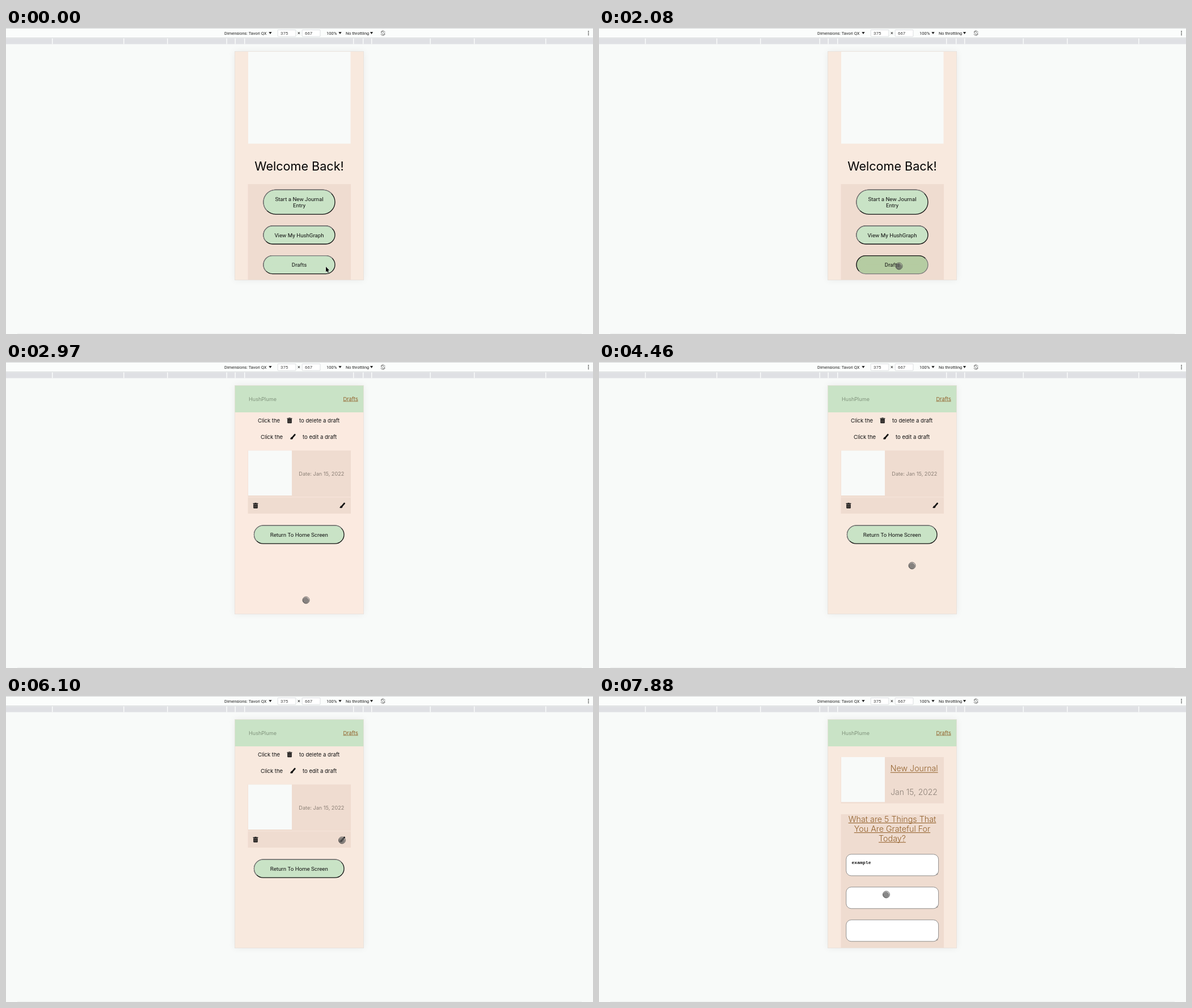
Recreate the animation shown at these times as an HTML page with a canvas. Size 1035x541 px, loop 8000 ms.

```html
<!DOCTYPE html>
<html lang="en">
<head>
<meta charset="utf-8">
<title>Journal app preview</title>
<style>
html, body { margin: 0; width: 100%; height: 100%; overflow: hidden; background: #f8faf9; }
canvas { display: block; width: 1035px; height: 541px; }
</style>
</head>
<body>
<canvas id="stage"></canvas>
<script>
const W = 1035, H = 541, LOOP = 8000;
const canvas = document.getElementById('stage');
const ctx = canvas.getContext('2d');
const dpr = window.devicePixelRatio || 1;
canvas.width = W * dpr;
canvas.height = H * dpr;

const SANS = 'Inter, "Open Sans", sans-serif';
const UI = 'Roboto, "Liberation Sans", sans-serif';
const MONO = '"Liberation Mono", monospace';
const GREEN = '#c9e3c6', PANEL = '#efdcd0';
const BROWN = '#92602a', MUTED = '#8d8177', INK = '#111';
const REST = [201, 227, 198], PRESSED = [181, 204, 162];

// Pointer stops: time, x, y
const POINTER = [
  [0, 564, 422], [150, 559, 422], [290, 548, 422], [440, 543, 421.5],
  [880, 544.5, 421], [1180, 535, 421], [1330, 529, 421],
  [4460, 552, 360], [4600, 573, 291], [4750, 579.5, 268.5],
  [5050, 583.5, 265.5], [5200, 590, 262], [5350, 597, 258], [5500, 601.5, 257],
  [5650, 600, 257], [5800, 596, 256], [5950, 593, 255.5], [6100, 592.5, 255],
  [7290, 562, 290], [7440, 520, 338], [7590, 503, 352], [7880, 506.5, 351]
];
const TOUCH_AT = 880;

function rect(x, y, w, h, color) {
  ctx.fillStyle = color;
  ctx.fillRect(x, y, w, h);
}

function roundRect(x, y, w, h, r) {
  ctx.beginPath();
  ctx.roundRect(x, y, w, h, r);
}

function poly(points, color) {
  ctx.beginPath();
  points.forEach(([x, y]) => ctx.lineTo(x, y));
  ctx.closePath();
  ctx.fillStyle = color;
  ctx.fill();
}

function text(str, x, y, size, { font = SANS, weight = 400, color = INK, align = 'left', line = 0 } = {}) {
  ctx.font = `${weight} ${size}px ${font}`;
  ctx.textAlign = align;
  ctx.fillStyle = color;
  ctx.fillText(str, x, y);
  if (line) {
    const w = ctx.measureText(str).width;
    const left = align === 'center' ? x - w / 2 : align === 'right' ? x - w : x;
    rect(left, y + line, w, size / 14, color);
  }
}

function toolbar() {
  rect(0, 0, W, 17, '#fbfdfc');
  rect(0, 0, W, 1, '#d6d9d9');
  rect(0, 17, W, 1, '#d3d6d8');
  rect(0, 18.5, W, 10, '#dfe0e4');
  for (const x of [81, 207, 284, 388.5, 403.5, 420, 612, 629, 644, 747.5, 825, 951]) {
    rect(x, 18, 1.4, 10.5, '#fbfdfc');
  }
  const ui = { font: UI, color: '#222' };
  text('Dimensions: Tavori QX', 385, 11.7, 7.45, ui);
  text('100%', 565, 11.7, 7.6, ui);
  text('No throttling', 599, 11.7, 7.4, ui);
  for (const x of [466, 589, 644.5]) poly([[x - 2.6, 7], [x + 2.6, 7], [x, 11]], '#222');
  for (const [x, str] of [[479, '375'], [522, '667']]) {
    roundRect(x + 0.2, 3.3, 31.8, 11.8, 1);
    ctx.fillStyle = '#fff';
    ctx.fill();
    ctx.strokeStyle = '#cfd1d4';
    ctx.lineWidth = 0.7;
    ctx.stroke();
    text(str, x + 5, 12, 7.9, { ...ui, color: '#444' });
  }
  text('×', 514, 12.3, 9, ui);

  // rotate icon and menu dots
  ctx.strokeStyle = '#555';
  ctx.lineWidth = 0.8;
  ctx.beginPath();
  ctx.arc(664.5, 9, 4, -2.6, -0.3);
  ctx.moveTo(668.3, 10.3);
  ctx.arc(664.5, 9, 4, 0.3, 2.7);
  ctx.stroke();
  ctx.save();
  ctx.translate(664.5, 9);
  ctx.rotate(-Math.PI / 4);
  ctx.strokeRect(-1.5, -3, 3, 6);
  ctx.restore();
  for (const y of [6, 9, 12]) {
    ctx.beginPath();
    ctx.arc(1027, y, 0.9, 0, 7);
    ctx.fillStyle = '#444';
    ctx.fill();
  }
}

function pill(x, y, w, h, lines, press = 0) {
  const r = h / 2;
  const fill = `rgb(${REST.map((c, i) => Math.round(c + (PRESSED[i] - c) * press))})`;
  const [lit, dark] = press ? [INK, '#777'] : ['#777', INK];
  const paint = edge => {
    roundRect(x, y, w, h, r);
    ctx.fillStyle = fill;
    ctx.fill();
    ctx.lineWidth = 1.3;
    ctx.strokeStyle = edge;
    ctx.stroke();
  };
  paint(dark);
  // bevel: the top and left edges take the other shade
  ctx.save();
  ctx.beginPath();
  ctx.moveTo(x - 2, y - 2);
  ctx.lineTo(x + w + 2, y - 2);
  ctx.lineTo(x + w - r, y + r);
  ctx.lineTo(x + r, y + r);
  ctx.lineTo(x - 2, y + h + 2);
  ctx.clip();
  paint(lit);
  ctx.restore();
  lines.forEach((str, i) => {
    const ly = y + r + 3.5 + (i - (lines.length - 1) / 2) * 11.6;
    text(str, x + w / 2, ly, 9.7, { font: UI, align: 'center' });
  });
}

function trash(x, y) {
  rect(x - 4.4, y - 4.3, 8.8, 1.4, INK);
  rect(x - 1.5, y - 5, 3, 1, INK);
  roundRect(x - 3.8, y - 2.4, 7.6, 7.2, [0, 0, 1, 1]);
  ctx.fillStyle = INK;
  ctx.fill();
  for (const dx of [-2, 0, 2]) rect(x + dx - 0.25, y - 1.3, 0.5, 5, '#c9b8ac');
}

function brush(x, y) {
  ctx.strokeStyle = INK;
  ctx.lineCap = 'round';
  ctx.lineWidth = 2.7;
  ctx.beginPath();
  ctx.moveTo(x + 3.6, y - 3.7);
  ctx.lineTo(x - 0.2, y + 0.6);
  ctx.stroke();
  ctx.lineCap = 'butt';
  ctx.beginPath();
  ctx.moveTo(x - 2, y + 0.4);
  ctx.quadraticCurveTo(x + 1, y + 1, x + 0.4, y + 3);
  ctx.quadraticCurveTo(x - 1.5, y + 5.6, x - 5, y + 3.8);
  ctx.quadraticCurveTo(x - 3.6, y + 3, x - 3.6, y + 1.8);
  ctx.quadraticCurveTo(x - 3, y + 0.5, x - 2, y + 0.4);
  ctx.fillStyle = INK;
  ctx.fill();
}

function home(t) {
  rect(427, 42, 180.5, 162.5, '#f8faf9');
  text('Welcome Back!', 517, 252.3, 21.6, { align: 'center', color: '#000' });
  rect(426.5, 276, 181.5, 169, PANEL);
  const press = t < 1780 ? 0 : t < 1930 ? 0.6 : 1;
  pill(454, 286.2, 126, 43.2, ['Start a New Journal', 'Entry']);
  pill(454, 350, 126, 32, ['View My HushGraph']);
  pill(454, 402.6, 126, 32, ['Drafts'], press);
}

function header() {
  rect(403.5, 41.5, 227, 47.5, GREEN);
  text('HushPlume', 428, 68.5, 9.1, { color: '#80937c' });
  text('Drafts', 620.8, 68.5, 9.3, { color: BROWN, align: 'right', line: 1 });
}

function drafts(t) {
  const icons = t >= 2520, image = t >= 2820;
  const nudge = icons ? 0.5 : 0;
  header();
  text('Click the', 444.5 - nudge, 106.7 + nudge, 9.5);
  text('to delete a draft', 516.5 + nudge, 106.7 + nudge, 9.55);
  text('Click the', 450 - nudge * 2, 135.7 + nudge, 9.5);
  text('to edit a draft', 522 + nudge * 2, 135.7 + nudge, 9.55);

  const cardH = image ? 82 : 28;
  const rowY = 156.5 + cardH + 0.8;
  rect(426.5, 156.5, 181.5, cardH, PANEL);
  rect(426.5, rowY, 181.5, 28.8, PANEL);
  if (image) rect(427, 156.5, 77, 79.5, '#f8faf9');
  text('Date: Jan 15, 2022', 596.3, image ? 201 : 174, 9.15, { color: MUTED, align: 'right' });
  if (icons) {
    trash(500, 103.5);
    brush(505.7, 132.2);
    trash(440, rowY + 14.6);
    brush(593, rowY + 14.4);
  }
  pill(437.5, image ? 289.2 : 234.7, 158.5, 32, ['Return To Home Screen']);
}

function field(y, value) {
  roundRect(435.8, y, 162.8, 38, 9);
  ctx.fillStyle = '#fff';
  ctx.fill();
  ctx.strokeStyle = '#777';
  ctx.lineWidth = 0.8;
  ctx.stroke();
  ctx.beginPath();
  ctx.moveTo(594, y + 36.5);
  ctx.lineTo(597.5, y + 33);
  ctx.moveTo(596, y + 36.5);
  ctx.lineTo(597.5, y + 35);
  ctx.stroke();
  if (value) text(value, 445.5, y + 17.4, 8.1, { font: MONO, weight: 700 });
}

function journal() {
  const link = { color: BROWN, weight: 300, align: 'center', line: 1.5 };
  header();
  rect(426.5, 108, 181.5, 81.7, PANEL);
  rect(427, 108, 77, 79.5, '#f8faf9');
  text('New Journal', 555.7, 133.2, 14.2, link);
  text('Jan 15, 2022', 555.5, 174.5, 13.9, { color: MUTED, weight: 300, align: 'center' });
  rect(426.5, 209, 181.5, 236, PANEL);
  ['What are 5 Things That', 'You Are Grateful For', 'Today?'].forEach((str, i) => {
    text(str, 517, 222.5 + i * 17.1, 14.3, link);
  });
  field(279.8, 'example');
  field(337.8);
  field(395.8);
}

function arrow(x, y) {
  ctx.beginPath();
  for (const [dx, dy] of [[0, 0], [0, 9.2], [2, 7.4], [3.4, 10.6], [5, 9.9], [3.6, 6.8], [6.2, 6.6]]) {
    ctx.lineTo(x + dx, y + dy);
  }
  ctx.closePath();
  ctx.lineJoin = 'round';
  ctx.lineWidth = 1;
  ctx.strokeStyle = '#fff';
  ctx.stroke();
  ctx.fillStyle = '#000';
  ctx.fill();
}

function touch(x, y) {
  const disc = (dx, dy, r) => {
    ctx.beginPath();
    ctx.arc(x + dx, y + dy, r, 0, 7);
  };
  disc(0, 0, 6);
  ctx.fillStyle = 'rgba(255,255,255,.35)';
  ctx.fill();
  ctx.strokeStyle = 'rgba(30,30,30,.85)';
  ctx.lineWidth = 0.8;
  ctx.stroke();
  disc(-0.4, 0.5, 5.1);
  ctx.fillStyle = 'rgba(50,50,50,.58)';
  ctx.fill();
  ctx.strokeStyle = 'rgba(40,40,40,.5)';
  ctx.lineWidth = 0.6;
  ctx.stroke();
}

function phone(t) {
  ctx.save();
  ctx.shadowColor = 'rgba(0,0,0,.06)';
  ctx.shadowBlur = 12 * dpr;
  rect(403, 41, 228, 405, '#dddedd');
  ctx.restore();
  ctx.save();
  ctx.beginPath();
  ctx.rect(403.5, 41.5, 227, 404);
  ctx.clip();
  rect(403, 41, 228, 405, t >= 2220 && t < 4460 ? '#fbeae0' : '#f8e9de');
  if (t < 2220) home(t);
  else if (t < 7000) drafts(t);
  else journal();
  ctx.restore();
}

function draw(now) {
  const t = now % LOOP;
  ctx.setTransform(dpr, 0, 0, dpr, 0, 0);
  rect(0, 0, W, H, '#f8faf9');
  rect(20, 539.5, W - 40, 1.5, '#f1f3f2');
  toolbar();
  phone(t);
  const [, x, y] = POINTER.findLast(stop => stop[0] <= t);
  if (t < TOUCH_AT) arrow(x, y);
  else touch(x, y);
}

const start = performance.now();
function tick() {
  draw(performance.now() - start);
  requestAnimationFrame(tick);
}
tick();
</script>
</body>
</html>
```
